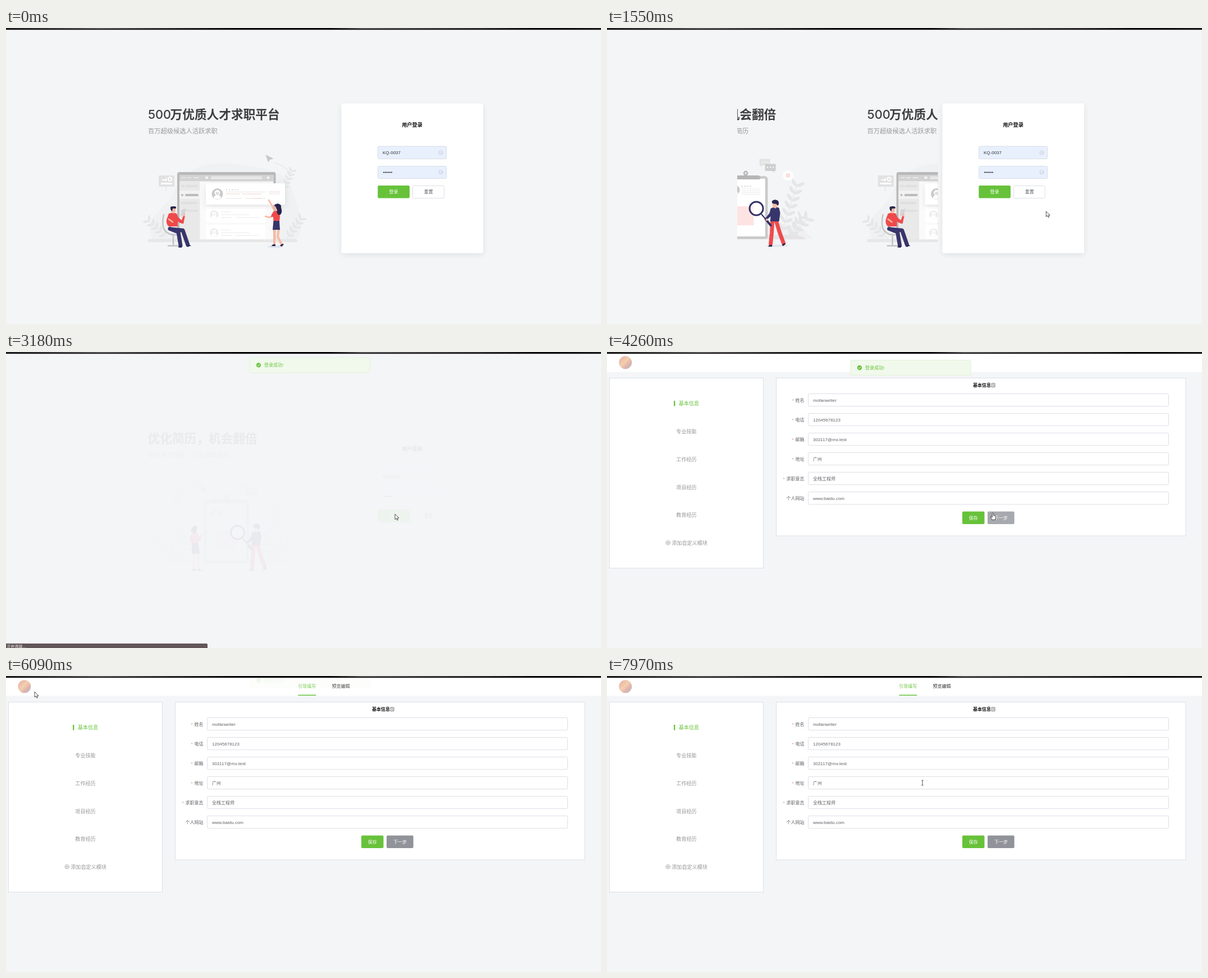
An HTML page that plays this animation: 1060x528 px, repeating every 8000 ms.

```html
<!DOCTYPE html>
<html lang="zh-CN">
<head>
<meta charset="utf-8">
<title>求职平台</title>
<style>
html, body { margin: 0; width: 100%; height: 100%; overflow: hidden; background: #f4f5f7; }
svg { display: block; width: 1060px; height: 528px; }
text { font: 8px "Liberation Sans", "Noto Sans CJK SC", "Noto Sans CJK", sans-serif; fill: #606266; }
.mid { text-anchor: middle; }
.end { text-anchor: end; }
.white { fill: #fff; }
.green { fill: #67c23a; }
.bold { font-weight: 700; fill: #111; }
.head { font: 600 21.7px "Noto Sans CJK SC", "Noto Sans CJK", sans-serif; fill: #3d3d3f; }
.head .num { font-family: Inter, sans-serif; font-weight: 500; }
.sub { font: 11.25px "Noto Sans CJK SC", "Noto Sans CJK", sans-serif; fill: #999; }
.menu text { font-size: 9.1px; fill: #959699; }
.menu .green { fill: #67c23a; }
.box { fill: #fff; stroke: #dcdfe6; }
.navy { fill: #37356b; }
.red { fill: #ee4a4c; }
.skin { fill: #fab9a2; }
.dark { fill: #28264f; }
.line { fill: none; stroke-linecap: round; stroke-linejoin: round; }
</style>
</head>
<body>
<svg viewBox="0 0 1060 528">
<defs>
  <clipPath id="stage"><rect x="232" y="120" width="357.5" height="285"/></clipPath>
  <linearGradient id="strip">
    <stop offset="0" stop-color="#222"/><stop offset=".16" stop-color="#6a6668"/>
    <stop offset=".4" stop-color="#080608"/><stop offset=".54" stop-color="#080608"/>
    <stop offset=".6" stop-color="#666"/><stop offset=".8" stop-color="#3a3638"/>
    <stop offset=".9" stop-color="#080608"/><stop offset="1" stop-color="#222"/>
  </linearGradient>
  <linearGradient id="photo" x2="1" y2="1">
    <stop offset="0" stop-color="#e9a9a4"/><stop offset=".45" stop-color="#f3cfae"/>
    <stop offset=".7" stop-color="#dfb3ab"/><stop offset="1" stop-color="#a9bfd8"/>
  </linearGradient>
  <filter id="shadow" x="-20%" y="-20%" width="140%" height="140%">
    <feDropShadow dx="0" dy="3" stdDeviation="6" flood-color="#000" flood-opacity=".09"/>
  </filter>
  <g id="bust">
    <circle r="10" fill="#c9c9c9"/>
    <circle cy="-2" r="5" fill="#fff"/><path d="M-6.5 7Q-6 2 0 2T6.5 7Q0 12-6.5 7Z" fill="#fff"/>
    <circle cy="-1" r="3" fill="#dedede"/>
  </g>
  <g id="tick" class="line"><circle r="3.5"/><path d="M-1.7 0-.4 1.3 1.8-1.1"/></g>
</defs>

<rect width="1060" height="528" fill="#f4f5f7"/>

<g id="login">
  <g clip-path="url(#stage)">
    <g id="jobs">
      <text class="head" x="253" y="162"><tspan class="num">500</tspan><tspan x="292.5">万优质人才求职平台</tspan></text>
      <text class="sub" x="253" y="188">百万超级候选人活跃求职</text>
      <path d="M262 378C240 340 285 325 300 290S350 235 410 243 500 255 510 290 540 350 515 378Z" fill="#f0f1f2"/>
      <g id="jobLeaves" fill="#e5e6e7" stroke="#e5e6e7"></g>
      <rect x="253" y="376.5" width="266" height="5.5" rx="2" fill="#e7e7e8"/>
      <path d="M305 377V261q0-4 4-4h167.5q4 0 4 4V377Z" fill="#b9b9b9"/>
      <rect x="309" y="262" width="167.5" height="115" fill="#fafafa"/>
      <rect x="309" y="262" width="167.5" height="11.5" fill="#d3d3d3"/>
      <path d="M313 267h7m3 0h7m4 0h10M365 267h91" stroke="#e8e8e8" stroke-width="2"/>
      <rect x="365" y="264.5" width="91" height="5.5" rx="1" fill="#e7e7e7"/>
      <path d="M355 267h5m105 0h4" stroke="#f3f3f3" stroke-width="4"/>
      <rect x="309" y="273.5" width="36.5" height="103.5" fill="#e9e9e9"/>
      <path d="M312 282h6m2 0h22M312 312h28M312 326h30" stroke="#e0e0e0" stroke-width="4"/>
      <rect x="309" y="290" width="36" height="15" fill="#f2f2f2"/>
      <circle cx="314" cy="298" r="2" fill="#bbb"/><path d="M321 298h20" class="line" stroke="#bbb" stroke-width="4"/>
      <g id="rows"></g>
      <g filter="url(#shadow)"><rect x="356" y="277" width="141" height="38" rx="2" fill="#fff"/></g>
      <use href="#bust" x="376.5" y="296"/>
      <path d="M392 288.5h24" stroke="#d8d8d8" stroke-width="2" stroke-dasharray="2 3"/>
      <path d="M392 292.5h70M392 304h28m6 0h36M468 296h20" stroke="#eee" stroke-width="1.4"/>
      <path d="M392 296h24m5 0h34M438 304h16M468 292.5h20" stroke="#f8dfdf" stroke-width="1.4"/>
      <path d="M272 263h28v20h-28Z" fill="#e2e2e3"/>
      <path d="M278 270h5l3-3v7l-3-2h-5Z" fill="#fff"/><circle cx="292" cy="269.5" r="3" class="line" stroke="#fff" stroke-width="2"/>
      <path d="M276 277.5h20" stroke="#fff" stroke-width="3"/>
      <path d="M285 284v6M478 241Q494 243 507 259" class="line" stroke="#d5d5d5" stroke-dasharray="2 2"/>
      <path d="M462.500 226 476.500 233 470 235 467 239.500Z" fill="#c8c8ca"/>

      <ellipse cx="480" cy="390" rx="14" ry="2.500" fill="#dfe3ec"/>
      <path d="M479 333 470 338 462 336M479 328 473 315 468 307" class="line" stroke="#fab9a2" stroke-width="2.600"/>
      <path d="M478 358 478 386M486 358 484 372 491 386" class="line" stroke="#fab9a2" stroke-width="4"/>
      <path d="M473 389q2-4 7-3v3ZM488 388q5-5 7-2l-4 4Z" class="dark"/>
      <path d="M476 328q5-4 11-1l1 10-1 9H477L476 337l-4 0 1-4Z" class="red"/>
      <path d="M476.500 344H487L488 360H475Z" class="navy"/>
      <circle cx="482" cy="320" r="4" class="skin"/>
      <path d="M478 316q4-4 9-2 4 2 3 6 2 6 1 9-2 6-6 4-3-3-2-8-1-5-5-9Z" class="dark"/>

      <path d="M281 333q-5 24 5 31 7 7 23 4M298 368v20M289 388.500h18" class="line" stroke="#c4c4c6" stroke-width="2.500"/>
      <path d="M296 359 315 361 324 387M292 358 307 364 311 388" class="line" stroke="#37356b" stroke-width="7"/>
      <path d="M307 391.500q0-4 6-3v3ZM323 389q3-4 7 0H323Z" class="dark"/>
      <path d="M313 324 321 322 317 334 311 336Z" fill="#d4d5da"/>
      <path d="M290 331q8-3 14 0l3 7 6 5 3-9 3 1-3 14q-5 0-10-4l0 9H290q-5-4-4-12Z" class="red"/>
      <path d="M290 341 297 346M317 335 318 331" class="line" stroke="#fab9a2" stroke-width="2.500"/>
      <path d="M294 322h8l0 5-3 4-4-1Z" class="skin"/>
      <path d="M293 319q6-2 10 0l0 3-6 0-1 5q-4-3-3-8Z" class="dark"/>
    </g>

    <g id="resume">
      <text class="head" x="252.500" y="162">优化简历，机会翻倍</text>
      <text class="sub" x="252.500" y="187.500">专业导师辅导，打造高薪简历</text>
      <path d="M248 376q0-18 22-20 20-10 60-8h120q50 5 52 18l12 10Z" fill="#f0f0f2"/>
      <g id="resumeLeaves" fill="#e5e6e7" stroke="#e5e6e7"></g>
      <path d="M278 377q20-10 50-8h150q20 2 22 8Z" fill="#e4e4e5"/>
      <g transform="rotate(14 307 258)"><rect x="301" y="247" width="11" height="22" rx="1" fill="#dfdfe0"/><path d="M303 252h7m-7 4h7" stroke="#f4f4f4"/></g>
      <g transform="rotate(10 342 239)"><rect x="331" y="232" width="23" height="14" fill="#e0e0e1"/><path d="M331 232l11.500 8 11.500-8" class="line" stroke="#f4f4f4"/></g>
      <circle cx="352" cy="246" r="3.800" fill="#b8b8b8"/><path d="M350 246l1.500 1.500 2.500-3" class="line" stroke="#fff"/>
      <path d="M337 251q-8 15 0 26t14 23" class="line" stroke="#ddd" stroke-dasharray="2 2"/>
      <path d="M418 233.500h19v11.500h-14l-3 3v-3h-2Z" fill="#e3e3e4"/>
      <path d="M428 242.500h19v12.500h-3v3l-3-3h-13Z" fill="#cfcfd0"/>
      <path d="M422 239.500h13M431.500 248.500h13" stroke="#fff" stroke-width="2" stroke-dasharray="2 3"/>
      <circle cx="469" cy="263" r="9.200" fill="#fff"/><rect x="465.500" y="259.500" width="7" height="7" fill="#fbdcda"/>
      <rect x="355.500" y="266.500" width="75" height="107.500" rx="3" fill="#fff" stroke="#c9c9ca" stroke-width="4.500"/>
      <path d="M367 270v-4q0-3 4-3h44q4 0 4 3v4Z" fill="#b5b5b6"/>
      <circle cx="393.500" cy="259" r="3" class="line" stroke="#b5b5b6" stroke-width="2.500"/>
      <use href="#bust" transform="translate(374 289) scale(.9)"/>
      <path d="M386 282.500h20" stroke="#d0d0d0" stroke-width="2" stroke-dasharray="2 3"/>
      <path d="M386 287h34m-34 3.500h34m-34 3h34m-34 3h34" stroke="#eaeaeb"/>
      <rect x="374" y="318" width="34" height="34" fill="#fde4e3"/>

      <ellipse cx="338" cy="390" rx="16" ry="2.500" fill="#dfe5ec"/><ellipse cx="450" cy="388.500" rx="20" ry="2" fill="#e2e5ea"/>
      <path d="M334 358 335 386M342 358 343 386" class="line" stroke="#fab9a2" stroke-width="4"/>
      <path d="M331 390q1-4 7-3v3ZM341 390q1-4 6-2v2Z" class="dark"/>
      <path d="M331 325q4-5 10-2l3 7 4-5 2 2-4 10-4 0v5H331q-5-8-3-14Z" class="red"/>
      <path d="M331 341H343L345 360H331Z" class="navy"/>
      <circle cx="338" cy="316" r="3.800" class="skin"/><path d="M347 331 349 326" class="line" stroke="#fab9a2" stroke-width="2"/>
      <path d="M331 314q4-6 9-3 2 3-1 5 1 6-2 7-6 1-8-4Z" class="dark"/>

      <path d="M441 345 440 365 438 385M448 345 454 365 461 384" class="line" stroke="#ee4a4c" stroke-width="7"/>
      <path d="M433.500 390q2-4 7-3v3ZM458 387q4-5 7-2l-5 4Z" class="dark"/>
      <path d="M438 322q8-5 15-1l2 9-2 15H437l1-9-7 6-2-3 7-9Z" class="navy"/>
      <circle cx="412.500" cy="322" r="12" fill="#fff" fill-opacity=".55" stroke="#343266" stroke-width="3"/>
      <path d="M421.500 332 429 341" stroke="#343266" stroke-width="2"/><path d="M429 341 438 352" class="line" stroke="#343266" stroke-width="4"/>
      <circle cx="431" cy="342" r="2" class="skin"/>
      <path d="M441 311h9v7l-3 4-5-2Z" class="skin"/>
      <path d="M440 309q5-5 11-1 3 4 0 9l-3-3-7-1Z" class="dark"/>
    </g>
  </g>

  <rect x="597.500" y="134.500" width="252.500" height="267" rx="3" fill="#fff" filter="url(#shadow)"/>
  <text class="mid bold" x="723.500" y="176" style="font-size:9.200px">用户登录</text>
  <g fill="#e8f0fe" stroke="#d9dde6"><rect x="662.500" y="211" width="122" height="22.500" rx="2"/><rect x="662.500" y="246.500" width="122" height="22" rx="2"/></g>
  <text x="671" y="225" style="fill:#333">KQ-0037</text>
  <path d="M673 257.500h14.200" class="line" stroke="#222" stroke-width="2.200" stroke-dasharray="0 2.800"/>
  <g stroke="#c0c4cc" stroke-width=".8"><use href="#tick" x="774.500" y="222.300"/><use href="#tick" x="774.500" y="257.300"/></g>
  <rect id="enter" x="662.300" y="281" width="56.700" height="22.500" rx="2"/>
  <text class="mid white" x="690.500" y="295">登录</text>
  <rect class="box" x="724.500" y="281.500" width="56" height="22" rx="2"/>
  <text class="mid" x="752.800" y="295">重置</text>
</g>

<g id="editor">
  <rect y="3" width="1060" height="32.500" fill="#fff"/>
  <circle cx="32.800" cy="18.800" r="11.500" fill="url(#photo)"/>
  <text class="mid green" x="536.300" y="21">引导填写</text>
  <rect class="green" x="520.300" y="33.500" width="32" height="1.500"/>
  <text class="mid" x="596.500" y="21" style="fill:#303133">预览编辑</text>
  <rect class="box" x="4.500" y="46.500" width="274" height="339"/>
  <rect class="green" x="119" y="87" width="2.300" height="9.500"/>
  <g class="menu" id="menu"></g>
  <g class="line" stroke="#959699" stroke-width=".8"><circle cx="108.700" cy="340.300" r="3.700"/><path d="M106.700 340.300h4m-2-2v4"/></g>
  <rect class="box" x="301.500" y="46.500" width="729.500" height="281.500"/>
  <text class="bold" x="652" y="62">基本信息</text>
  <path d="M685.500 56h5.500v6.500h-5.500Zm1.500 2h2m-2 2h3" class="line" stroke="#444" stroke-width=".7"/>
  <g id="form"></g>
  <rect class="green" x="633" y="284.500" width="39.500" height="22.500" rx="2"/>
  <text class="mid white" x="652.800" y="298.500">保存</text>
  <rect id="next" x="678" y="284.500" width="47.700" height="22.500" rx="2"/>
  <text class="mid white" x="702" y="298.500">下一步</text>
</g>

<g id="toast">
  <rect x="434" y="14.500" width="214" height="27" rx="2" fill="#f0f9eb" stroke="#e1f3d8"/>
  <circle class="green" cx="450" cy="28" r="4.200"/><path d="M448 28l1.500 1.500 2.600-2.900" class="line" stroke="#fff"/>
  <text class="green" x="460" y="31">登录成功!</text>
</g>

<g id="status">
  <path d="M0 520H357q2 0 2 2v6H0Z" fill="#625658"/>
  <text class="white" x="1.500" y="527.500" style="font-size:7px">正在连接...</text>
</g>
<rect width="1060" height="3.200" fill="#080608"/><rect width="1060" height="1.800" fill="url(#strip)"/>

<g id="cursor" stroke="#222" stroke-width=".8" stroke-linejoin="round">
  <path id="arrow" fill="#fff" d="M0 0V9.600L2.300 7.700 3.800 11 5.400 10.300 4 7.100H6.900Z"/>
  <path id="hand" fill="#fff" d="M-1.200 1C-1.200-.3 1-.3 1 1V4.800L3.600 5.400Q5.200 5.800 5 7.400L4.200 12.500H-1.400L-4 8.200Q-4 6.600-2.600 7L-1.200 8.200Z"/>
  <path id="beam" fill="none" d="M-1.800-4.500H-.5L0-4 .5-4.500H1.800M0-4V4M-1.800 4.500H-.5L0 4 .5 4.500H1.800"/>
</g>
</svg>
<script>
const LOOP = 8000, SLIDE = 357;
const $ = id => document.getElementById(id);
const clamp = v => Math.min(1, Math.max(0, v));

// Stem with paired leaves, growing from x,y at an angle in degrees from upright
function sprig(x, y, angle, len, pairs) {
  let s = `<path d="M0 0V${-len}" class="line" stroke-width="1"/>`;
  for (let i = 1; i <= pairs; i++) {
    const h = -len * i / (pairs + .3), r = len / pairs * .55;
    for (const side of [-1, 1])
      s += `<ellipse cx="${side * r}" cy="${h}" rx="${r}" ry="${r * .38}" stroke="none" transform="rotate(${side * -40} 0 ${h})"/>`;
  }
  return `<g transform="translate(${x} ${y}) rotate(${angle})">${s}</g>`;
}
$('jobLeaves').innerHTML = sprig(290, 376, -48, 50, 5) + sprig(498, 378, 36, 48, 5) + sprig(492, 292, 25, 42, 5);
$('resumeLeaves').innerHTML = sprig(325, 374, -58, 72, 6) + sprig(350, 374, -36, 72, 5) +
  sprig(455, 372, 18, 98, 7) + sprig(462, 376, 48, 56, 4) + sprig(470, 376, 30, 46, 4);

$('rows').innerHTML = [319, 351].map(y => `
  <rect x="356" y="${y}" width="106" height="${y < 340 ? 28 : 26}" fill="#fff"/>
  <use href="#bust" transform="translate(371 ${y + 14}) scale(.75)" opacity=".35"/>
  <path d="M383 ${y + 9}h18m-18 5h50m-50 5h20m6 0h42" stroke="#f1f1f1" stroke-width="1.400"/>`).join('');

$('menu').innerHTML = ['基本信息', '专业技能', '工作经历', '项目经历', '教育经历', '添加自定义模块'].map((name, i) =>
  `<text x="${i ? i < 5 ? 123.3 : 115.2 : 127.7}" y="${95.4 + i * 49.7}" class="${i ? '' : 'green'}">${name}</text>`).join('');

const fields = [['姓名', 'mofanwriter'], ['电话', '12045678123'], ['邮箱', '302117@mx.test'],
  ['地址', '广州'], ['求职意志', '全栈工程师'], ['个人网站', 'www.baidu.com']];
const rowY = i => 74.5 + i * 35;
$('form').innerHTML = fields.map(([name, value], i) => {
  const y = rowY(i);
  return `<text class="end" x="351.500" y="${y + 14}">${name}</text>` +
    (i < 5 ? `<text x="${346.5 - 8 * name.length}" y="${y + 14.5}" style="fill:#e0876a" class="end"><tspan dx="2">*</tspan></text>` : '') +
    `<rect class="box" x="358.500" y="${y}" width="642" height="22.200" rx="2"/>` +
    `<text x="367" y="${y + 14}">${value}</text>`;
}).join('');

// CSS-style cubic-bezier timing
function bezier(x1, y1, x2, y2) {
  const at = (a, b, u) => 3 * a * u * (1 - u) ** 2 + 3 * b * u * u * (1 - u) + u ** 3;
  return x => {
    x = clamp(x);
    let lo = 0, hi = 1;
    for (let i = 0; i < 20; i++) {
      const u = (lo + hi) / 2;
      if (at(x1, x2, u) < x) lo = u; else hi = u;
    }
    return at(y1, y2, hi);
  };
}
const ease = bezier(.25, .1, .25, 1), easeInOut = bezier(.42, 0, .58, 1);

// Pointer path: time, x, y
const path = [[0, 1030, 545], [70, 1006, 512], [380, 902, 370], [1310, 902, 370], [1550, 782.5, 327],
  [1930, 715, 293], [2100, 693, 289], [4180, 693, 289], [4260, 688, 287], [4580, 517, 220],
  [5030, 986, 100], [5250, 820, 172], [5860, 70, 50], [6090, 51, 28], [6250, 58, 47], [6430, 58, 47],
  [6800, 4, 104], [6900, 4, 104], [7150, 130, 30], [7740, 624, 264], [7820, 636, 272], [7970, 562, 190.5]];
function pointer(t) {
  const k = path.findIndex(p => p[0] > t);
  if (k < 0) return path[path.length - 1].slice(1);
  const [t0, x0, y0] = path[k - 1], [t1, x1, y1] = path[k];
  const p = (t - t0) / (t1 - t0);
  return [x0 + (x1 - x0) * p, y0 + (y1 - y0) * p];
}

const inside = (x, y, l, t, r, b) => x >= l && x <= r && y >= t && y <= b;
const show = (id, on) => $(id).style.display = on ? '' : 'none';
const move = (id, x, y) => $(id).setAttribute('transform', `translate(${x} ${y})`);
const fade = (id, v) => { $(id).style.opacity = v; show(id, v > 0); };

function draw(t) {
  const slide = easeInOut((t - 1330) / 400);
  move('jobs', SLIDE * slide, 0);
  move('resume', SLIDE * (slide - 1), 0);
  show('jobs', slide < 1);
  show('resume', slide > 0);

  fade('login', 1 - ease((t - 2970) / 300));
  fade('editor', ease((t - 3270) / 300));
  const enter = t - 2970, leave = t - 5910;
  fade('toast', leave < 0 ? ease(enter / 300) : 1 - ease(leave / 300));
  move('toast', 0, -27 * (leave < 0 ? 1 - ease(enter / 400) : ease(leave / 400)));
  show('status', t >= 3040 && t < 3600);

  const [x, y] = pointer(t), editing = t >= 3570;
  const onEnter = !editing && inside(x, y, 662, 281, 719, 304);
  const onNext = editing && inside(x, y, 678, 284, 726, 307);
  const onField = editing && fields.some((f, i) => inside(x, y, 358, rowY(i), 1001, rowY(i) + 22));
  const onHand = onNext || onEnter && t < 2180;
  $('enter').setAttribute('fill', onEnter ? '#78cd50' : '#67c23a');
  $('next').setAttribute('fill', onNext ? '#a6a9ad' : '#909399');
  show('hand', onHand);
  show('beam', onField);
  show('arrow', !onHand && !onField);
  move('cursor', x, y);
}

function tick(now) {
  draw(now % LOOP);
  requestAnimationFrame(tick);
}
draw(0);
requestAnimationFrame(tick);
</script>
</body>
</html>
```
